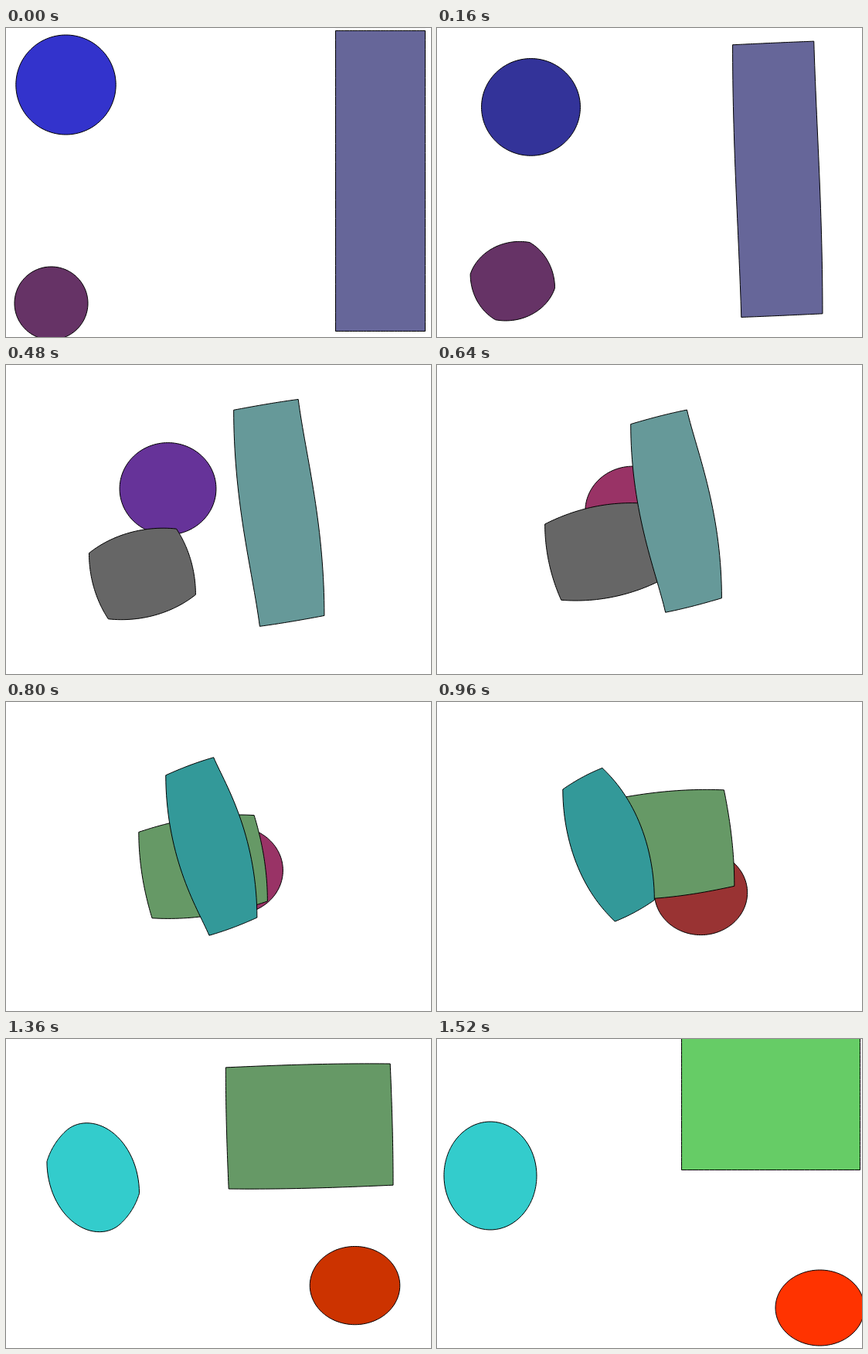
Write an HTML page with a canvas that moves like this. It is 550 px wide and 400 px high and loops after 1600 ms.

```html
<!DOCTYPE html>
<html lang="en">
<head>
<meta charset="utf-8">
<title>Shape morphs</title>
<style>
  html, body { margin: 0; width: 100%; height: 100%; overflow: hidden; background: #fff; }
  canvas { display: block; }
</style>
</head>
<body>
<canvas id="stage" width="550" height="400"></canvas>
<script>
const ctx = document.getElementById('stage').getContext('2d');
const STEPS = 20, STEP_MS = 80, SEGMENTS = 32;

const lerp = (a, b, t) => a + (b - a) * t;
const mix = (a, b, t) => a.map((v, i) => lerp(v, b[i], t));
const radians = degrees => degrees * Math.PI / 180;

// Snap each channel to the six-level web palette.
const LEVEL_STARTS = [25.5, 78, 128, 192, 240];
const webLevel = v => 51 * LEVEL_STARTS.filter(start => v >= start).length;
const webColor = rgb => `rgb(${rgb.map(webLevel).join(',')})`;

// Outline functions take a side (0-3, from the top left, clockwise) and a position u along it.
function ellipse(cx, cy, rx, ry, secondCorner = 90) {
  const marks = [180, 180 + secondCorner, 360, 360 + secondCorner, 540].map(radians);
  return (side, u) => {
    const angle = lerp(marks[side], marks[side + 1], u);
    return [cx + rx * Math.cos(angle), cy + ry * Math.sin(angle)];
  };
}

function box(left, top, right, bottom) {
  const corners = [[left, top], [right, top], [right, bottom], [left, bottom]];
  return (side, u) => mix(corners[side], corners[(side + 1) % 4], u);
}

const shapes = [
  {
    from: ellipse(77.5, 73.5, 64.7, 64.5), to: ellipse(495.5, 348, 57.5, 49),
    colors: [[51, 51, 204], [255, 51, 0]]
  },
  {
    from: ellipse(58.5, 356.3, 47.5, 47.3, 103.5), to: box(316.5, -0.7, 547.5, 169.5),
    colors: [[102, 51, 102], [102, 204, 102]]
  },
  {
    from: box(426.5, 3.5, 542.5, 392.5), to: ellipse(69, 177, 60, 70, 38.8),
    colors: [[102, 102, 153], [51, 204, 204]]
  }
];

function drawShape({ from, to, colors }, t) {
  ctx.beginPath();
  for (let side = 0; side < 4; side++) {
    for (let i = 0; i < SEGMENTS; i++) {
      const u = i / SEGMENTS;
      ctx.lineTo(...mix(from(side, u), to(side, u), t));
    }
  }
  ctx.closePath();
  ctx.fillStyle = webColor(mix(colors[0], colors[1], t));
  ctx.fill();
  ctx.stroke();
}

function render(now) {
  const step = Math.floor(now / STEP_MS) % STEPS;
  ctx.fillStyle = '#fff';
  ctx.fillRect(0, 0, 550, 400);
  ctx.strokeStyle = '#000';
  ctx.lineWidth = 1;
  for (const shape of shapes) drawShape(shape, step / (STEPS - 1));
}

let start;
function tick(now) {
  start ??= now;
  render(now - start);
  requestAnimationFrame(tick);
}
render(0);
requestAnimationFrame(tick);
</script>
</body>
</html>
```
